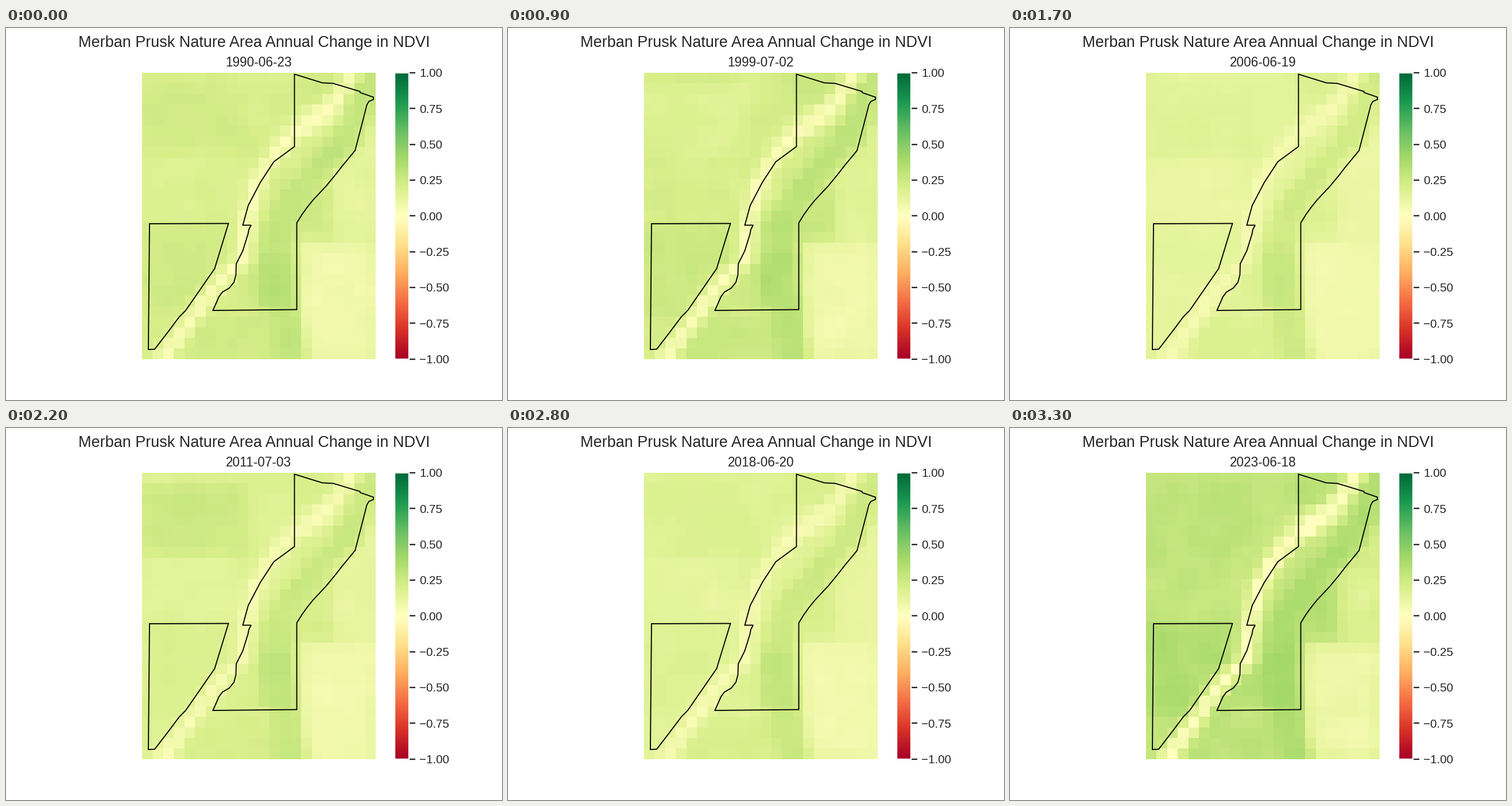
A matplotlib script that plays this animation: 864x648 px, repeating every 3400 ms.

```python
import matplotlib.pyplot as plt
import numpy as np
from matplotlib.animation import FuncAnimation
from matplotlib.patches import Polygon

plt.rcParams.update({
    "font.family": "Liberation Sans",
    "font.size": 12,
    "text.color": "0.15",
    "axes.edgecolor": "white",
    "axes.linewidth": 1.25,
    "ytick.color": "0.15",
    "ytick.labelsize": 11,
    "ytick.major.size": 6,
    "ytick.major.width": 1.25,
})

ROWS, COLS = 27, 22
R, C = np.mgrid[0:ROWS, 0:COLS].astype(float)

# One survey a year, two in 2000 and none in 2012.
years = [*range(1990, 2001), *range(2000, 2012), *range(2013, 2024)]

# Overall greenness and the north-west crop, eased between a few surveys.
KEYS = [years.index(y) for y in (1990, 1995, 2002, 2006, 2011, 2018, 2023)]
VIGOR = [0.20, 0.26, 0.18, 0.14, 0.17, 0.16, 0.28]
CROP = [0.22, 0.12, 0.22, 0.16, 0.24, 0.18, 0.30]


def ramp(d):
    return 1 / (1 + np.exp(-d / 0.3))


def block(r0, r1, c0, c1):
    """Soft-edged mask covering an inclusive block of cells."""
    return (ramp(R - r0 + 0.5) * ramp(r1 + 0.5 - R)
            * ramp(C - c0 + 0.5) * ramp(c1 + 0.5 - C))


# Centre lines of the creek and of the wooded strip beside it.
creek = np.interp(R, [0, 2, 4, 6, 8, 10, 13, 17, 19, 21, 23, 26],
                  [19.1, 17.8, 15.7, 13, 11.4, 10.3, 9.5, 9, 7, 5.4, 4, 1.8])
woods = np.interp(R, [0, 4, 6, 8, 10, 12, 14, 18, 26],
                  [20.2, 19.4, 18.5, 16.5, 14.8, 13.3, 12.3, 12.2, 13.5])
creek_width = (0.75 + 0.35 * abs(np.gradient(creek, axis=0))
               + 0.8 * np.exp(-((R - 3.8) / 1.3) ** 2))
creek_mask = np.exp(-((C - creek) / creek_width) ** 2)
woods_mask = np.exp(-((C - woods) / 1.6) ** 4)

# Cover layers, bottom to top: mask, response to vigor, offset.
layers = [
    (block(8, 13, 0, 8), 1.2, -0.06),                    # west strip
    (block(14, 22, 0, 7), 1.6, -0.09),                   # south-west reserve
    (block(23, 26, 4, 14), 0.9, 0.06),                   # southern scrub
    (block(0, 2, 14, 18), 1.0, 0.04),                    # northern tip
    (ramp(C - woods - 2) * ramp(15.5 - R), 0.6, 0.02),   # open eastern slope
    (block(10, 15, 14, 17), 1.1, 0.02),                  # grove
    (block(16, 26, 15, 21), 0.1, 0.05),                  # south-east field
    (block(17, 21, 8, 13), 1.3, -0.03),                  # lower reserve
    (woods_mask, 0.9, 0.11),
    (block(17, 21, 11, 13), 0.9, 0.15),                  # dense stand
    (creek_mask, -0.35, 0.10),
]


def grain(seed, amount):
    """Patchy seeded noise, smoothed over neighbouring cells."""
    n = np.random.default_rng(seed).normal(0, amount, (ROWS, COLS))
    for axis in (0, 1):
        n = (np.roll(n, 1, axis) + 2 * n + np.roll(n, -1, axis)) / 4
    return n


def ndvi(i):
    v = np.interp(i, KEYS, VIGOR)
    crop = np.interp(i, KEYS, CROP)
    g = v + (crop - v) * block(1, 7, 0, 9)
    for mask, gain, offset in layers:
        g += (gain * v + offset - g) * mask
    return g + grain(i, 0.13 * v)


def pass_date(i):
    """First overpass of the 16-day cycle from 18 June, or the one after it."""
    start = np.datetime64(f"{years[i]}-06-18")
    wait = (np.datetime64("1990-06-23") - start).astype(int) % 16
    repeat = years[:i].count(years[i])
    return str(start + wait + 16 * repeat)


fig, ax = plt.subplots(figsize=(6.4, 4.8), dpi=135, facecolor="white")
fig.suptitle("Merban Prusk Nature Area Annual Change in NDVI", fontsize=14.4)

# Data units are stage pixels measured from the top left.
right, top, side = 643.68, 77.76, 18.48
image = ax.imshow(ndvi(0), cmap="RdYlGn", vmin=-1, vmax=1, interpolation="nearest",
                  extent=(right - COLS * side, right, top + ROWS * side, top))
fig.colorbar(image, ax=ax)
ax.axis("off")
title = ax.set_title(pass_date(0), fontsize=12)

east = [(502.5, 80.5), (551, 95.5), (570, 96.5), (616.5, 110.5), (617, 112.5),
        (640, 120.5), (640, 124.5), (632, 128), (628.5, 134), (624, 152),
        (608, 213.5), (584, 242.5), (574, 255.5), (557.5, 275.5), (535, 299.5),
        (524.5, 312.5), (515.5, 325), (506.5, 339.5), (506.5, 490.5), (360.5, 492),
        (371, 468), (377, 460), (389, 453), (397, 443), (400.5, 430),
        (401, 411), (412.5, 388), (421.5, 359), (423, 351), (427, 343.5),
        (412.5, 343.5), (422, 309), (443, 269), (466.5, 233), (502.5, 206.5)]
west = [(250, 341), (387.5, 340.5), (363.5, 419), (313, 492), (302, 503),
        (281, 531), (259, 559.5), (248, 560)]
for outline in (east, west):
    ax.add_patch(Polygon(outline, closed=True, fill=False, edgecolor="black", linewidth=1))


def draw(i):
    image.set_data(ndvi(i))
    title.set_text(pass_date(i))
    return image, title


anim = FuncAnimation(fig, draw, frames=len(years), interval=100,
                     repeat=True, repeat_delay=0)
plt.show()
```
